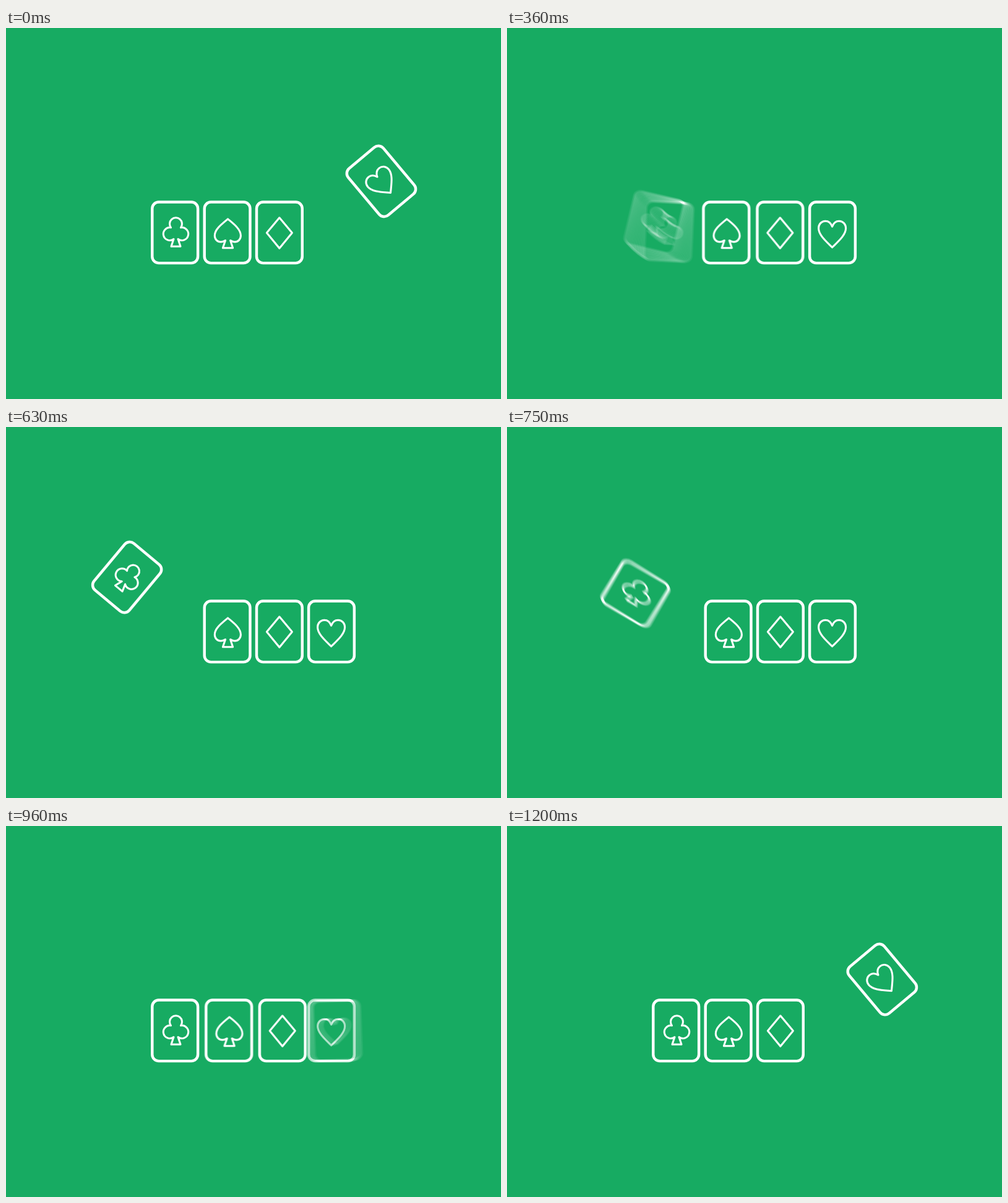
Animation of 800 by 600 pixels, one loop 1.23 s. Source, as an HTML page with a canvas:

```html
<!DOCTYPE html>
<html lang="en">
<head>
<meta charset="utf-8">
<title>Card cradle</title>
<style>
  html, body { margin: 0; width: 100%; height: 100%; overflow: hidden; background: #17ab62; }
  canvas { display: block; }
</style>
</head>
<body>
<canvas width="800" height="600"></canvas>
<script>
const ctx = document.querySelector('canvas').getContext('2d');
const LOOP = 1230, STEP = 30, SAMPLES = 15;
const LAND = 252, LAUNCH = 968;

const card = new Path2D();
card.roundRect(-36.9, -49.3, 73.8, 98.6, 10.5);

const club = new Path2D('M-2.2 10.5A10.4 10.4 0 1 1-6.7-8A10 10 0 1 1 9.3-8A10.4 10.4 0 1 1 4.8 10.5L8.8 22.5H-6.2Z');
const spade = new Path2D('M.9-22C-7-15-20.3-6-20.3 5C-20.3 11-16 15.2-10.5 15.2C-7.5 15.2-5 14.2-3 12.8L-7.2 25H9L5 12.8C7 14.2 9.5 15.2 12.2 15.2C17.5 15.2 21.8 11 21.8 5C21.8-6 9-15 .9-22Z');
const diamond = new Path2D('M0-24L20.5.5L0 25.5L-20.5.5Z');
const heart = new Path2D('M-.4-9.5C-2.4-15-6.4-18.5-11.4-18.5C-17.9-18.5-22.4-13.5-22.4-7C-22.4 4-10.4 14-.4 24C9.6 14 21.6 4 21.6-7C21.6-13.5 17.1-18.5 10.6-18.5C5.6-18.5 1.6-15-.4-9.5Z');

const clamp = v => Math.min(1, Math.max(0, v));
const wrap = t => (t % LOOP + LOOP) % LOOP;

function ease(x, x1, y1, x2, y2) {
  const curve = (u, a, b) => 3 * a * u * (1 - u) ** 2 + 3 * b * u * u * (1 - u) + u ** 3;
  let low = 0, high = 1;
  for (let i = 0; i < 20; i++) {
    const mid = (low + high) / 2;
    if (curve(mid, x1, x2) < x) low = mid; else high = mid;
  }
  return curve(low, y1, y2);
}

// Distance from rest: 1 at the top of the swing, 0 in the row
function lift(t) {
  if (t < LAND) return 1 - ease(t / LAND, 1, 0, .8, 1);
  return t < LAUNCH ? 0 : ease((t - LAUNCH) / (LOOP - LAUNCH), .1, .45, 0, 1);
}

const squashKeys = [[0, 0], [60, .05], [135, .8], [190, 1.1], [258, 1], [310, 0],
  [LAUNCH, 0], [1005, .8], [1065, .42], [1130, 0], [LOOP, 0]];

function squash(t) {
  const i = squashKeys.findIndex(key => key[0] > t);
  const [t0, v0] = squashKeys[i - 1], [t1, v1] = squashKeys[i];
  return v0 + (v1 - v0) * (t - t0) / (t1 - t0);
}

function drawCard(suit, x, y, angle = 0, sx = 1, sy = 1, drop = 0) {
  ctx.save();
  ctx.translate(x, y);
  ctx.rotate(angle * Math.PI / 180);
  ctx.save();
  ctx.translate(0, drop);
  ctx.scale(sx, sy);
  ctx.lineWidth = 4.4;
  ctx.stroke(card);
  ctx.restore();
  ctx.scale(sx, sy);
  ctx.lineWidth = 3;
  ctx.stroke(suit);
  ctx.restore();
}

function drawSwing(suit, x, t, dx, dy, angle) {
  const s = lift(t), q = squash(t), sy = 1 - .24 * q;
  drawCard(suit, x + dx * s, 330.8 + dy * s ** 1.85, angle * s ** 1.4,
    1 + .2 * q, sy, 51 * (1 - sy) * (1 - s));
}

const nudge = (t, start) => 6 * Math.sin(Math.PI * clamp((t - start) / 125));

function drawScene(t) {
  const heartTime = wrap(t), clubTime = wrap(t - LOOP / 2);
  const push = (first, second) => nudge(clubTime, first) - nudge(heartTime, second);
  drawSwing(club, 273.2, clubTime, -77.8, -88.2, 40);
  drawCard(spade, 357.6, 330.8);
  drawSwing(heart, 526, heartTime, 80.5, -83, -40);
}

function drawMiddle(t) {
  const heartTime = wrap(t), clubTime = wrap(t - LOOP / 2);
  const push = (fromClub, fromHeart) => nudge(clubTime, fromClub) - nudge(heartTime, fromHeart);
  drawCard(spade, 357.6 + push(245, 265), 330.8);
  drawCard(diamond, 441.9 + push(265, 245), 330.8);
}

function drawEnds(t) {
  drawSwing(club, 273.2, wrap(t - LOOP / 2), -77.8, -88.2, 40);
  drawSwing(heart, 526, wrap(t), 80.5, -83, -40);
}

function frame(now) {
  const t = Math.floor(now % LOOP / STEP) * STEP;
  ctx.clearRect(0, 0, 800, 600);
  // Motion blur: add up equal exposures over half a step
  ctx.globalCompositeOperation = 'lighter';
  ctx.globalAlpha = 1 / SAMPLES;
  for (let i = 0; i < SAMPLES; i++) {
    drawMiddle(t + i);
    drawEnds(t + i);
  }
  requestAnimationFrame(frame);
}

ctx.strokeStyle = '#fff';
ctx.lineJoin = 'round';
requestAnimationFrame(frame);
</script>
</body>
</html>
```
